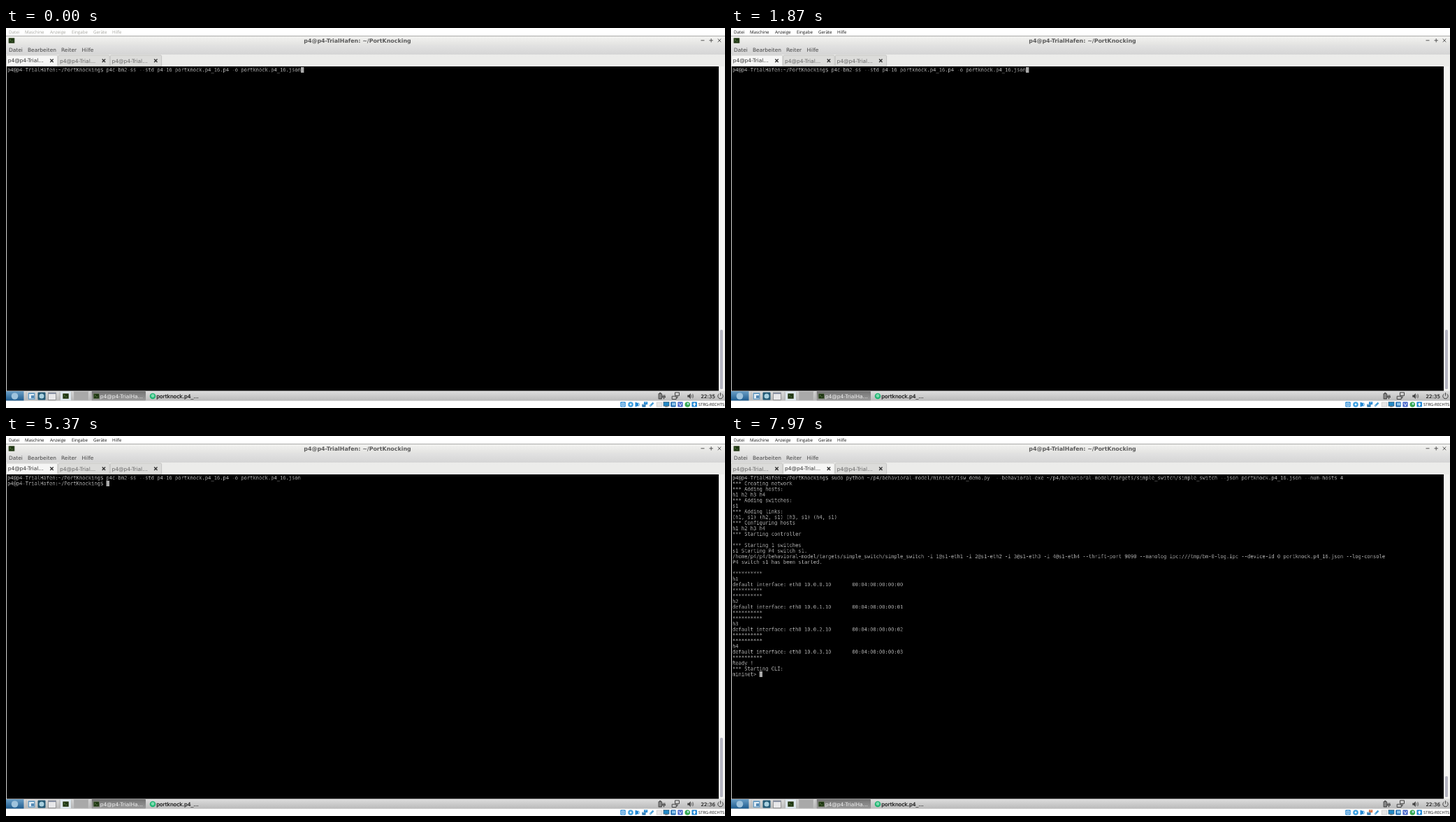
Animation of 1029 by 544 pixels, one loop 8000 ms. Source, as an HTML page with a canvas:

```html
<!DOCTYPE html>
<html lang="de">
<head>
<meta charset="utf-8">
<style>
html, body { margin: 0; width: 100%; height: 100%; overflow: hidden; background: #fff; }
body { position: relative; text-rendering: geometricPrecision; }
svg { position: absolute; left: 0; top: 0; font: 7.46px "DejaVu Sans", sans-serif; }
.host { font-family: "Open Sans", sans-serif; }
canvas { position: absolute; left: 1.6px; top: 56.2px; }
</style>
</head>
<body>
<svg id="desk" width="1029" height="544" viewBox="0 0 1029 544">
  <defs>
    <linearGradient id="title" x2="0" y2="1"><stop stop-color="#f4f4f2"/><stop offset="1" stop-color="#e2e2e0"/></linearGradient>
    <linearGradient id="menu" x2="0" y2="1"><stop stop-color="#e2e2e2"/><stop offset="1" stop-color="#d5d5d5"/></linearGradient>
    <linearGradient id="panel" x2="0" y2="1"><stop stop-color="#dedede"/><stop offset="1" stop-color="#b9b9b9"/></linearGradient>
    <linearGradient id="start" x2="0" y2="1"><stop stop-color="#6c9fc6"/><stop offset="1" stop-color="#1d5b8e"/></linearGradient>
    <linearGradient id="task" x2="0" y2="1"><stop stop-color="#747474"/><stop offset="1" stop-color="#9a9a9a"/></linearGradient>
  </defs>
</svg>
<canvas id="terminal" width="1896" height="855"></canvas>
<script>
const LOOP = 8000;
// The terminal is a grid of 8 x 15 cells on a 1920 pixel wide desktop, shown reduced
const CELL_W = 8, CELL_H = 15, SCALE = 1029 / 1920;
const host = 'p4@p4-TrialHafen';
const prompt = host + ':~/PortKnocking$ ';
const desk = document.getElementById('desk');
const terminal = document.getElementById('terminal');
const ctx = terminal.getContext('2d');
terminal.style.width = terminal.width * SCALE + 'px';
terminal.style.height = terminal.height * SCALE + 'px';

const add = (markup) => desk.insertAdjacentHTML('beforeend', markup);
const rect = (x, y, w, h, fill, extra = '') =>
  add(`<rect x="${x}" y="${y}" width="${w}" height="${h}" fill="${fill}" ${extra}/>`);
const circle = (x, y, r, fill, extra = '') =>
  add(`<circle cx="${x}" cy="${y}" r="${r}" fill="${fill}" ${extra}/>`);
const stroke = (d, color, width = 1) =>
  add(`<path d="${d}" fill="none" stroke="${color}" stroke-width="${width}"/>`);
const label = (x, y, text, fill, extra = '') =>
  add(`<text x="${x}" y="${y}" fill="${fill}" ${extra}>${text}</text>`);
const cross = (x, y, r, color, width) =>
  stroke(`M${x - r} ${y - r}l${2 * r} ${2 * r}m0 ${-2 * r}l${-2 * r} ${2 * r}`, color, width);
const byId = (id) => document.getElementById(id);

function terminalIcon(x, y) {
  rect(x, y, 9, 8, '#6f7a62', 'rx="1"');
  rect(x + .8, y + .8, 7.4, 6.4, '#1d3512');
  stroke(`M${x + 2} ${y + 2.2}l1.5 1.2l-1.5 1.2m2.2 .4h2`, '#7fa35e', .7);
}

// Outer menu bar
rect(0, 0, 1029, 11, '#fff');
add('<g id="hostMenu" class="host" font-size="6.2"></g>');
[['Datei', 4], ['Maschine', 27], ['Anzeige', 63], ['Eingabe', 94], ['Geräte', 125], ['Hilfe', 152]]
  .forEach(([name, x]) => byId('hostMenu').insertAdjacentHTML('beforeend', `<text x="${x}" y="8">${name}</text>`));

// Title bar and window menu
rect(0, 11, 1029, 14, 'url(#title)');
rect(0, 11, 1029, .7, '#8c8c8c');
terminalIcon(3.5, 14);
label(503, 20.6, host + ': ~/PortKnocking', '#5a5a5a', 'font-size="7.92" font-weight="bold" text-anchor="middle"');
stroke('M994.5 17.8h5M1006.5 17.8h5.4m-2.7 -2.7v5.4', '#555', 1);
cross(1021, 17.8, 2.3, '#555', 1);
rect(0, 24.5, 1029, 13.5, 'url(#menu)');
[['Datei', 4], ['Bearbeiten', 31], ['Reiter', 79], ['Hilfe', 108.5]]
  .forEach(([name, x]) => label(x, 33.7, name, '#444'));

// Tabs
rect(0, 38, 1029, 17, '#ececea');
for (let i = 0; i < 3; i++) {
  const x = i * 74.4;
  rect(x + .4, 39, 73.4, 16, '#dcdcda', `id="tab${i}" stroke="#b8b8b6" stroke-width=".7" rx="1.5"`);
  label(x + 2.7, 49.4, 'p4@p4-Trial…', '#555', `id="tabName${i}"`);
  cross(x + 65.5, 46.8, 2.2, '#333', 1.4);
}

// Terminal area with scrollbar
rect(0, 55, 1029, 465, '#d4d4d2');
rect(1, 55, 1019, 464.6, '#000');
rect(1020.3, 55, 8.4, 464.6, '#f4f4f2');
rect(1022, 432, 4, 85, '#b4b4c0', 'id="thumb" rx="1.5"');

// Task bar
rect(0, 519.6, 1029, 14.2, 'url(#panel)');
rect(0, 520, 25.5, 13.5, 'url(#start)');
circle(12.5, 527, 4.8, '#9fc3dc');
stroke('M29 521v11M77 521v11M94 521v11M120.5 521v11', '#aaa', .7);
rect(31.5, 522, 10, 10, '#6d9fc4', 'rx="1"');
rect(33, 524, 7, 6.5, '#e1edf5');
rect(36, 526, 4, 4, '#5489b5');
rect(45.5, 521.5, 11, 11, '#245a76', 'rx="1"');
circle(51, 527, 3.5, '#a9d0df');
rect(60.5, 522, 11, 10.4, '#e8e8ea', 'stroke="#777" stroke-width=".7"');
rect(60.5, 522, 11, 2, '#8b93a5');
rect(78, 520.2, 15, 13, '#dce6ec');
terminalIcon(81, 523);
rect(97, 520.5, 21, 12.5, '#a9a9a9', 'stroke="#bbb" stroke-width=".6"');
rect(122.5, 520, 77.5, 13.4, 'url(#task)', 'rx="1"');
terminalIcon(124.8, 523);
label(134.8, 529.8, 'p4@p4-TrialHa…', '#f2f2f2');
circle(210, 527, 4.3, '#21b573');
circle(210, 526.5, 2.4, '#7edcb0');
label(215.3, 529.8, 'portknock.p4_…', '#111', 'stroke="#111" stroke-width=".2"');

// Tray
rect(933.5, 523, 5.5, 8.5, '#555', 'rx=".8"');
rect(935, 521.8, 2.5, 1.2, '#555');
stroke('M934.5 525h3.5m-3.5 2h3.5m-3.5 2h3.5', '#ddd', .7);
stroke('M940.3 525v2m2.4 -2v2m-3.2 .4h4v1.5h-4zm2 1.5v2.4', '#444', 1);
stroke('M957.5 521.8h6v4.5h-6zM953.2 527.2h6v4.3h-6zM961 526.5v3h-2', '#444', 1);
add('<path d="M975.3 525.5h2l2.5 -2.5v8l-2.5 -2.5h-2z" fill="#444"/>');
stroke('M981.2 525q1.3 2 0 4m1.5 -5.2q2.2 3.2 0 6.4', '#555', .8);
label(994.5, 529.6, '', '#222', 'id="clock" font-size="7.1" stroke="#222" stroke-width=".2"');
stroke('M1020.6 523.8a3.7 3.7 0 1 0 3.8 0M1022.5 522v4.5', '#444', 1);

// Outer status bar
rect(0, 533.8, 1029, 10.2, '#fff');
const blue = '#2489d6';
const badge = (x, fill) => rect(x - 3.7, 535.2, 7.4, 7.4, fill, 'rx="1"');
badge(883, blue);
stroke('M881 537h4v4h-4zM882 539h2', '#fff', .8);
circle(894, 539, 3.8, '#3a9ee0');
circle(894, 539, 1.4, '#fff');
add(`<path d="M900.5 535.5l4.5 1.5v4l-4.5 1.5z" fill="${blue}"/>`);
stroke('M905.5 536.5q2 2.5 0 5', '#56a9df', 1);
rect(913, 535, 5.2, 4, blue, 'id="netFar"');
rect(910.3, 538.5, 5.2, 4, '#1c6fae');
stroke('M911.3 539.6h3.2M914 536.1h3.2', '#d8ecfa', .7);
stroke('M921.5 541.5l5 -5', '#4a9ed6', 2.5);
stroke('M921 542l2 -2', '#9cc9e8', 1.2);
rect(931.2, 536, 7.6, 6, '#e7e7e7', 'stroke="#c4c4c4" stroke-width=".7"');
rect(941, 535.4, 8, 5.8, '#2388c5', 'stroke="#365a70" stroke-width=".7"');
rect(943, 541.5, 4, 1, '#555');
badge(955, '#1b67ad');
rect(953, 536.5, 5, 4, '#8dc6ec');
badge(965, '#4d6bcb');
stroke('M963 537l2 4l2 -4', '#fff', .9);
circle(975.3, 539, 3.8, '#38a952');
circle(976, 538, 1.5, '#b7e2ef');
rect(981.4, 535.2, 7.6, 7.4, blue, 'id="capture" rx="1"');
add('<path d="M985.2 536.3l2.5 2.6h-1.5v2.4h-2v-2.4h-1.5z" fill="#fff"/>');
label(991, 541.2, 'STRG-RECHTS', '#111', 'class="host" font-size="5.8"');

const compile = prompt + 'p4c-bm2-ss --std p4-16 portknock.p4_16.p4 -o portknock.p4_16.json';
const stars = '*'.repeat(10);
const hostBlocks = [0, 1, 2, 3].flatMap((i) => [
  stars, `h${i + 1}`,
  `default interface: eth0 10.0.${i}.10`.padEnd(40) + `00:04:00:00:00:0${i}`,
  stars,
]);
const session = [
  prompt + 'sudo python ~/p4/behavioral-model/mininet/1sw_demo.py  --behavioral-exe ' +
    '~/p4/behavioral-model/targets/simple_switch/simple_switch --json portknock.p4_16.json --num-hosts 4',
  '*** Creating network', '*** Adding hosts:', 'h1 h2 h3 h4 ', '*** Adding switches:', 's1 ',
  '*** Adding links:', '(h1, s1) (h2, s1) (h3, s1) (h4, s1) ', '*** Configuring hosts', 'h1 h2 h3 h4 ',
  '*** Starting controller', '', '*** Starting 1 switches', 's1 Starting P4 switch s1.',
  '/home/p4/p4/behavioral-model/targets/simple_switch/simple_switch -i 1@s1-eth1 -i 2@s1-eth2 ' +
    '-i 3@s1-eth3 -i 4@s1-eth4 --thrift-port 9090 --nanolog ipc:///tmp/bm-0-log.ipc ' +
    '--device-id 0 portknock.p4_16.json --log-console',
  'P4 switch s1 has been started.', '',
  ...hostBlocks,
  'Ready !', '*** Starting CLI:', 'mininet> ',
];

const ENTER = 2670, COMPILED = 4170, SWITCH_TAB = 5600;
// [time, finished lines] of the second session
const progress = [[6270, 10], [6470, 15], [6670, 33], [7100, session.length]];

function screenLines(t) {
  if (t < ENTER) return [compile];
  if (t < COMPILED) return [compile, ''];
  if (t < SWITCH_TAB) return [compile, prompt];
  const step = progress.findLast(([start]) => t >= start);
  if (!step) return [session[0]];
  const lines = session.slice(0, step[1]);
  return step[1] < session.length ? [...lines, ''] : lines;
}

function drawTerminal(lines) {
  ctx.clearRect(0, 0, terminal.width, terminal.height);
  ctx.font = '13.29px "DejaVu Sans Mono", monospace';
  ctx.fillStyle = '#aaa';
  lines.forEach((line, row) => ctx.fillText(line, 0, row * CELL_H + 12));
  const row = lines.length - 1;
  ctx.fillRect(lines[row].length * CELL_W, row * CELL_H, CELL_W, CELL_H);
}

const paint = (id, fill) => byId(id).setAttribute('fill', fill);

function draw(t) {
  drawTerminal(screenLines(t));

  const activeTab = t < SWITCH_TAB ? 0 : 1;
  for (let i = 0; i < 3; i++) {
    paint('tab' + i, i === activeTab ? '#f6f6f5' : '#dcdcda');
    paint('tabName' + i, i === activeTab ? '#333' : '#666');
    byId('tabName' + i).setAttribute('y', i === activeTab ? 49.1 : 49.7);
  }
  const thumbTop = activeTab ? 487 : 432;
  byId('thumb').setAttribute('y', thumbTop);
  byId('thumb').setAttribute('height', 517 - thumbTop);

  paint('hostMenu', t < 1870 ? '#a6a6a0' : '#111');
  paint('capture', t >= 1900 && t < COMPILED ? '#3fb64c' : blue);
  paint('netFar', t >= 7930 ? '#e0703c' : blue);
  byId('clock').textContent = t < COMPILED ? '22:35' : '22:36';
}

function frame() {
  draw(performance.now() % LOOP);
  requestAnimationFrame(frame);
}
frame();
</script>
</body>
</html>
```
